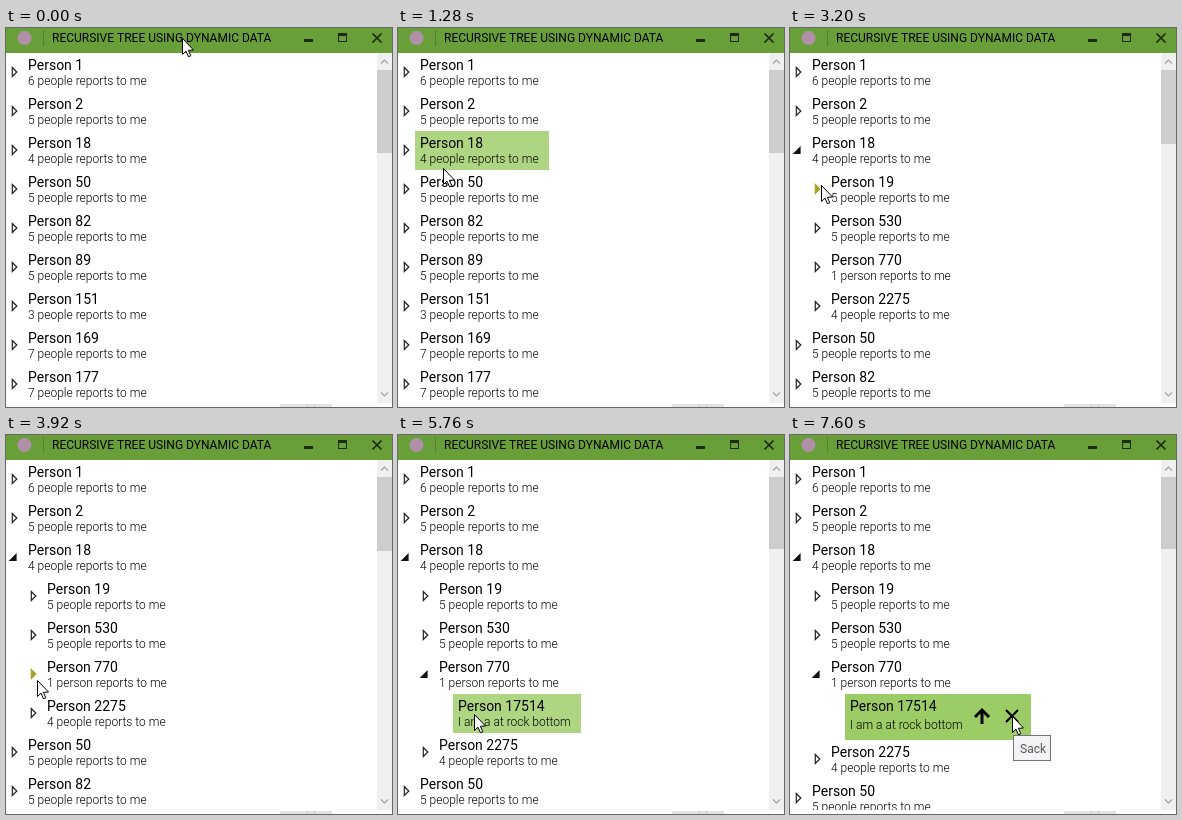
Animation, 386 px wide and 379 px high, one loop 8000 ms. Source, as an HTML page with a canvas:

```html
<!DOCTYPE html>
<html lang="en">
<head>
<meta charset="utf-8">
<title>Recursive tree</title>
<style>
  html, body { margin: 0; width: 100%; height: 100%; overflow: hidden; background: #fff; }
  canvas { display: block; }
</style>
</head>
<body>
<canvas id="stage"></canvas>
<script>
const canvas = document.getElementById('stage'), ctx = canvas.getContext('2d');
const WIDTH = canvas.width = 386, HEIGHT = canvas.height = 379;
const LOOP = 8000, TICK = 80;
const TOP = 25, BOTTOM = 375, ROW = 39, INDENT = 19, SCROLL = 15;
const LIST_W = WIDTH - SCROLL, CENTER = WIDTH - SCROLL / 2;
const SELECT = 6000, TOOLTIP = 7360;
const openAt = { 18: 2320, 770: 4400 };
const INK = '#000', DARK = '#1d2b12';
const BAR = '#689f38', HOVER = '#aed581', SELECTED = '#9ccc65';

// Each move leaves from where the previous one ended; bow is its sideways curve.
const home = { x: 177, y: 10 };
const moves = [
  { start: 400, end: 1280, x: 46, y: 140, bow: 0 },
  { start: 1280, end: 2080, x: 9, y: 123, bow: 0.2 },
  { start: 2880, end: 3760, x: 33, y: 245, bow: 0.3 },
  { start: 3760, end: 4240, x: 30, y: 244, bow: 0 },
  { start: 5040, end: 5840, x: 78, y: 280, bow: 0 },
  { start: 6400, end: 7360, x: 223, y: 281, bow: -0.1 }
];

const clamp = v => Math.min(1, Math.max(0, v));
const ease = p => p * p * (3 - 2 * p);

function cursorAt(t) {
  let { x, y } = home;
  for (const m of moves) {
    const p = ease(clamp((t - m.start) / (m.end - m.start)));
    const dx = m.x - x, dy = m.y - y, side = 2 * p * (1 - p) * m.bow;
    x += dx * p + dy * side;
    y += dy * p - dx * side;
  }
  return { x: Math.round(x), y: Math.round(y) };
}

const person = (id, reports, team = []) => ({ id, reports, team });
const staff = [
  person(1, 6), person(2, 5),
  person(18, 4, [
    person(19, 5), person(530, 5),
    person(770, 1, [person(17514, 0)]),
    person(2275, 4)
  ]),
  person(50, 5), person(82, 5), person(89, 5),
  person(151, 3), person(169, 7), person(177, 7)
];

const isOpen = (p, t) => t >= openAt[p.id];

function visibleRows(list, t, depth = 0) {
  return list.flatMap(p => [
    { p, depth },
    ...(isOpen(p, t) ? visibleRows(p.team, t, depth + 1) : [])
  ]);
}

function noteFor({ reports }) {
  if (!reports) return 'I am a at rock bottom';
  return `${reports} ${reports === 1 ? 'person' : 'people'} reports to me`;
}

function rect(color, x, y, w, h) {
  ctx.fillStyle = color;
  ctx.fillRect(x, y, w, h);
}

function text(str, x, y, font, color = INK) {
  ctx.font = font + ' Roboto, sans-serif';
  ctx.fillStyle = color;
  ctx.fillText(str, x, y);
  return ctx.measureText(str).width;
}

function trace(points, closed) {
  ctx.beginPath();
  for (const [x, y] of points) ctx.lineTo(x, y);
  if (closed) ctx.closePath();
}

function fill(points, color) {
  trace(points, true);
  ctx.fillStyle = color;
  ctx.fill();
}

function stroke(points, color, width, closed = false) {
  trace(points, closed);
  ctx.strokeStyle = color;
  ctx.lineWidth = width;
  ctx.stroke();
}

// A roof shape with its tip at (x, y); negative r points it down.
function chevron(x, y, r, color, width) {
  const reach = Math.abs(r);
  stroke([[x - reach, y + r], [x, y], [x + reach, y + r]], color, width);
}

function cross(x, y, r, color, width) {
  for (const s of [-r, r]) stroke([[x - r, y - s], [x + r, y + s]], color, width);
}

function drawExpander(x, y, open, hot) {
  if (open) {
    const right = x + 10.6, base = y + 23;
    fill([[right, base - 8], [right, base], [right - 8, base]], hot ? '#7cb342' : '#111');
    return;
  }
  const left = x + 6.3, mid = y + 19, color = hot ? '#a6a32c' : '#222';
  const shape = [[left, mid - 4.5], [left + 4.5, mid], [left, mid + 4.5]];
  if (hot) fill(shape, color);
  stroke(shape, color, 1.2, true);
}

function drawActions(x, y) {
  const up = x - 49, mid = y + 22;
  chevron(up, mid - 6, 7, INK, 3);
  rect(INK, up - 1.5, mid - 6, 3, 14);
  cross(x - 19, mid, 6, INK, 2.2);
}

function drawRow({ p, depth }, y, t, mouse) {
  const left = depth * INDENT, x = left + 17;
  const selected = !p.reports && t >= SELECT;
  const height = ROW + (selected ? 7 : 0);
  const note = noteFor(p);
  ctx.font = '300 12px Roboto, sans-serif';
  const width = Math.round(ctx.measureText(note).width) + (selected ? 73 : 15);
  const inRow = mouse.y >= y && mouse.y < y + height;
  const hovered = inRow && mouse.x >= x && mouse.x < x + width;

  if (selected || hovered) rect(selected ? SELECTED : HOVER, x, y, width, height);
  if (p.reports) drawExpander(left, y, isOpen(p, t), inRow && mouse.x >= left && mouse.x < x);
  text('Person ' + p.id, x + 5, y + 17, '14px');
  text(note, x + 5, y + (selected ? 35 : 32), '300 12px');
  if (selected) drawActions(x + width, y);
  return height;
}

function drawTree(t, mouse) {
  ctx.save();
  ctx.beginPath();
  ctx.rect(0, TOP, LIST_W, BOTTOM - TOP);
  ctx.clip();
  let y = TOP;
  for (const row of visibleRows(staff, t)) y += drawRow(row, y, t, mouse);
  ctx.restore();
}

// The thumb shrinks as more rows are visible.
function drawScrollbar(t) {
  const added = visibleRows(staff, t).length - staff.length;
  const thumb = 83 - 2.2 * added;
  rect('#f0f0f0', LIST_W, TOP, SCROLL, BOTTOM - TOP);
  rect('#cdcdcd', LIST_W, TOP + 17, SCROLL, Math.round(thumb));
  chevron(CENTER, TOP + 7, 3.5, '#a0a0a0', 1.2);
  chevron(CENTER, BOTTOM - 7, -3.5, '#a0a0a0', 1.2);
}

function drawWindow() {
  rect(BAR, 0, 0, WIDTH, TOP);
  ctx.beginPath();
  ctx.arc(18.5, 10, 7, 0, Math.PI * 2);
  ctx.fillStyle = '#b08fa9';
  ctx.fill();
  rect('#557f30', 37, 2, 1, 16);
  text('RECURSIVE TREE USING DYNAMIC DATA', 46, 14, '12px');

  rect(DARK, 298, 11, 9, 3);
  rect(DARK, 332, 5, 9, 9);
  rect(BAR, 333, 8, 7, 5);
  cross(371, 10, 4.5, DARK, 1.7);

  rect('#e2e2e2', 274, BOTTOM + 1, 52, 3);
  for (const x of [301, 308]) rect('#c8c8c8', x, BOTTOM + 1, 1, 3);
}

function drawTooltip(t) {
  ctx.globalAlpha = clamp((t - TOOLTIP) / 240);
  rect('#767676', 223, 300, 38, 26);
  rect('#f3f3f6', 224, 301, 36, 24);
  text('Sack', 230, 318, '12px', '#575757');
  ctx.globalAlpha = 1;
}

function drawCursor({ x, y }) {
  const shape = [[0, 0], [0, 16], [3.5, 12.7], [6, 18.3], [8.3, 17.3], [5.9, 11.8], [11, 11.5]]
    .map(([a, b]) => [x + a - 0.5, y + b + 0.5]);
  fill(shape, '#fff');
  stroke(shape, INK, 1, true);
}

function render(now) {
  const t = Math.floor((now % LOOP) / TICK) * TICK;
  const mouse = cursorAt(t);
  rect('#fff', 0, 0, WIDTH, HEIGHT);
  drawTree(t, mouse);
  drawScrollbar(t);
  drawWindow();
  drawTooltip(t);
  drawCursor(mouse);
}

const begin = performance.now();
function loop() {
  render(performance.now() - begin);
  requestAnimationFrame(loop);
}
loop();
</script>
</body>
</html>
```
